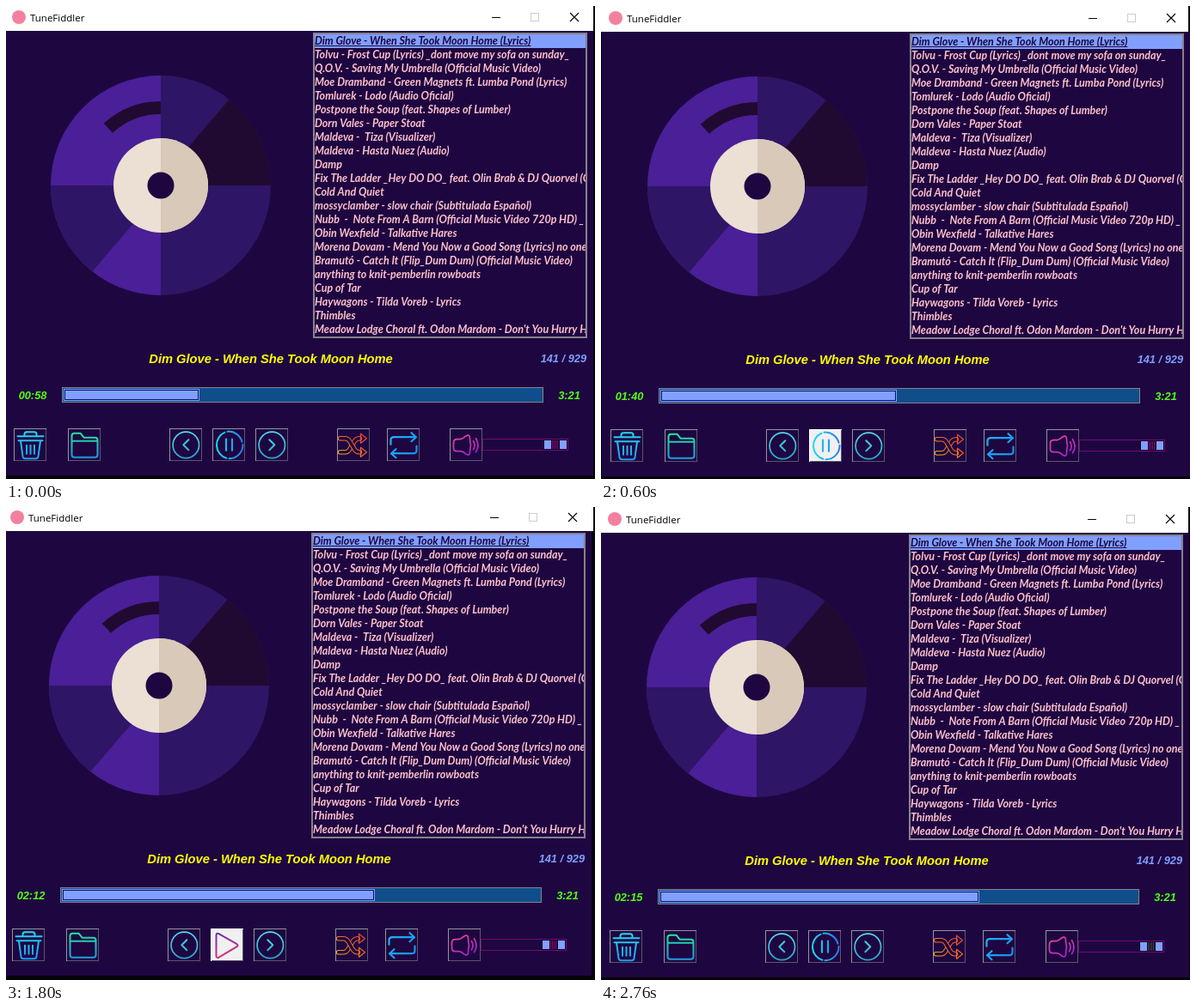
Recreate the animation shown at these times as an HTML page with a canvas. Size 685 px wide and 551 px high, loop 3000 ms.

```html
<!DOCTYPE html>
<html lang="en">
<head>
<meta charset="utf-8">
<title>TuneFiddler</title>
<style>
html, body { margin: 0; width: 100%; height: 100%; overflow: hidden; background: #050308; }
canvas { display: block; }
</style>
</head>
<body>
<canvas id="stage" width="685" height="551"></canvas>
<script>
const ctx = document.getElementById('stage').getContext('2d');
const BG = '#1e0741', BLUE = '#809fff', GRAY = '#85818c';
const STEP = 600;

const states = [
  { dx: 0, dy: 0, sec: 58, playing: true },
  { dx: 2, dy: 1, sec: 100, playing: true, hot: true },
  { dx: 0, dy: 1, sec: 132 },
  { dx: -2, dy: -1, sec: 132, hot: true },
  { dx: 1, dy: 1, sec: 135, playing: true, dimThumb: true }
];

const song = 'Dim Glove - When She Took Moon Home';
const songs = [
  song + ' (Lyrics)',
  'Tolvu - Frost Cup (Lyrics) _dont move my sofa on sunday_',
  'Q.O.V. - Saving My Umbrella (Official Music Video)',
  'Moe Dramband - Green Magnets ft. Lumba Pond (Lyrics)',
  'Tomlurek - Lodo (Audio Oficial)',
  'Postpone the Soup (feat. Shapes of Lumber)',
  'Dorn Vales - Paper Stoat',
  'Maldeva -  Tiza (Visualizer)',
  'Maldeva - Hasta Nuez (Audio)',
  'Damp',
  'Fix The Ladder _Hey DO DO_ feat. Olin Brab & DJ Quorvel (Official)',
  'Cold And Quiet',
  'mossyclamber - slow chair (Subtitulada Español)',
  'Nubb  -  Note From A Barn (Official Music Video 720p HD) _ Lyrics',
  'Obin Wexfield - Talkative Hares',
  'Morena Dovam - Mend You Now a Good Song (Lyrics) no one calls',
  'Bramutó - Catch It (Flip_Dum Dum) (Official Music Video)',
  'anything to knit-pemberlin rowboats',
  'Cup of Tar',
  'Haywagons - Tilda Voreb - Lyrics',
  'Thimbles',
  "Meadow Lodge Choral ft. Odon Mardom - Don't You Hurry Home"
];

function box(x, y, w, h, color) {
  ctx.fillStyle = color;
  ctx.fillRect(x, y, w, h);
}

function frame(x, y, w, h, color) {
  ctx.strokeStyle = color;
  ctx.lineWidth = 1;
  ctx.strokeRect(x + .5, y + .5, w - 1, h - 1);
}

function text(str, x, y, font, color, align = 'left') {
  ctx.font = font;
  ctx.fillStyle = color;
  ctx.textAlign = align;
  ctx.fillText(str, x, y);
}

function line(d, color, width) {
  ctx.strokeStyle = color;
  ctx.lineWidth = width;
  ctx.stroke(new Path2D(d));
}

// A full disc, or a slice whose tip may sit beside the centre.
function disc(x, y, r, color, from = 0, to = 360, tip = 0) {
  ctx.fillStyle = color;
  ctx.beginPath();
  if (to - from < 360) ctx.moveTo(x + tip, y);
  ctx.arc(x, y, r, from * Math.PI / 180, to * Math.PI / 180);
  ctx.fill();
}

function blend(x0, y0, x1, y1, ...colors) {
  const g = ctx.createLinearGradient(x0, y0, x1, y1);
  colors.forEach((c, i) => g.addColorStop(i / (colors.length - 1), c));
  return g;
}

function titleBar() {
  disc(15, 13, 8, '#f4809f');
  text('TuneFiddler', 28, 18, '11.5px "Open Sans", sans-serif', '#000');
  box(565, 13, 10, 1, '#000');
  frame(610, 8, 10, 10, '#ccc');
  line('M656 8 666 18M666 8 656 18', '#000', 1.1);
}

function record() {
  const x = 180, y = 209, light = '#4a1f97', mid = '#2f1565', dark = '#200a31';
  disc(x, y, 128, mid);
  disc(x, y, 128, light, 90, 270);
  disc(x, y, 128, mid, 128.5, 180, 6);
  disc(x, y, 128, dark, 308.5, 360, -6);
  ctx.beginPath();
  ctx.arc(x, y, 90.5, 227.5 * Math.PI / 180, 1.5 * Math.PI);
  ctx.strokeStyle = dark;
  ctx.lineWidth = 15;
  ctx.stroke();
  disc(x, y, 55, '#ecdfd4');
  disc(x, y, 55, '#d9c9b8', -90, 90);
  disc(x, y, 15.5, BG);
}

function playlist() {
  box(357, 31, 319, 356, GRAY);
  box(359, 33, 315, 352, BG);
  box(359, 33, 315, 16, BLUE);
  ctx.save();
  ctx.beginPath();
  ctx.rect(358, 33, 316, 352);
  ctx.clip();
  const font = 'italic bold 12.5px Lato, sans-serif';
  songs.forEach((name, i) => {
    const y = 45 + i * 16;
    text(name, 359, y, font, i ? '#ffc0cb' : BG);
    if (i) box(358, y - 9, 1, 3, '#b08da6');
    else box(359, y + 1, ctx.measureText(name).width, 1, BG);
  });
  ctx.restore();
}

function progress(state) {
  const sans = 'px "Liberation Sans", Arial, sans-serif';
  const small = 'italic bold 12.8' + sans;
  const clock = [state.sec / 60 | 0, state.sec % 60]
    .map(n => String(n).padStart(2, '0')).join(':');
  text(song, 308, 416, 'italic bold 14.7' + sans, '#ff0', 'center');
  text('141 / 929', 675, 415, small, BLUE, 'right');
  text(clock, 31, 458, small, '#5f1', 'center');
  text('3:21', 655, 458, small, '#5f1', 'center');

  box(65, 444, 560, 18, '#104e8b');
  frame(65, 444, 560, 18, GRAY);
  const end = Math.round(62 + state.sec * 2.785);
  box(67, 446, end - 66, 14, BLUE);
  frame(68, 447, end - 68, 12, '#0c1070');
}

const icons = {
  trash() {
    const c = blend(0, 3, 0, 35, '#25d8ef', '#1e9bf5');
    line('M4 8.5H34M12 8V6Q12 3.5 14.5 3.5H23.5Q26 3.5 26 6V8M5 13.5H33' +
      'M7.5 14 10 32Q10.5 34.5 13 34.5H25Q27.5 34.5 28 32L30.5 14M14.5 19V29M19 19V29M23.5 19V29', c, 2);
  },
  folder() {
    line('M4 30V8Q4 5 7 5H14L18 10H31Q34 10 34 13V30Q34 33 31 33H7Q4 33 4 30ZM4 14H34',
      blend(0, 5, 0, 33, '#24e59b', '#209be0'), 2);
  },
  prev() { chevron(-1); },
  next() { chevron(1); },
  pause() {
    const c = blend(3, 0, 35, 0, '#18e0f0', '#2a7be8');
    line('M16 34A16 16 0 0 1 14 4M17 3A16 16 0 0 1 34 15M35 18A16 16 0 0 1 19 34.5', c, 2);
    line('M15.5 12V25M22.5 12V25', c, 2.2);
  },
  play() {
    line('M6 7.5Q6 4 9 5.5L30 17.5Q32 19 30 20.5L9 33Q6 34 6 31Z',
      blend(8, 4, 16, 34, '#6a2bb0', '#e32f74'), 2);
  },
  shuffle() {
    const c = blend(32, 4, 5, 34, '#e33c35', '#f06a25', '#f8b020');
    const head = y => `M27 ${y - 5.5} 34 ${y}L27 ${y + 5.5}Z`;
    const ribbons = ['M3 27H9Q12 27 14 24L20 14Q22 11 26 11', 'M3 11H9Q12 11 14 14L20 24Q22 27 26 27'];
    ribbons.forEach((d, i) => {
      line(d, c, 5.4);
      line(d, BG, 3.4);
      line(head(i ? 27 : 11), c, 1.2);
    });
  },
  repeat() {
    const c = blend(4, 4, 34, 34, '#20b8f5', '#168be8');
    line('M4 18V13Q4 9.5 8 9.5H33M28 4.5 33.5 9.5 28 14.5' +
      'M34 20V25Q34 28.5 30 28.5H5M10 23.5 4.5 28.5 10 33.5', c, 2.2);
  },
  volume() {
    const c = blend(8, 5, 22, 34, '#f04a92', '#a020d0');
    line('M4 16Q4 12 8 12H12Q15 11.5 18 8.5Q23 5.5 23 11Q23 14 24 19Q23 24 23 27' +
      'Q23 32 18 29Q15 26 12 26H8Q4 26 4 22ZM27 14Q30 19 27 24M30 11Q35 19 30 27', c, 1.7);
  }
};

function chevron(dir) {
  const c = blend(0, 3, 0, 35, '#55dcf0', '#27a5c8');
  ctx.beginPath();
  ctx.arc(18.8, 18.7, 15.2, 0, 2 * Math.PI);
  ctx.strokeStyle = c;
  ctx.lineWidth = 1.7;
  ctx.stroke();
  const x = 18.8 - 3 * dir;
  line(`M${x} 12.5 ${x + 6 * dir} 18.5 ${x} 24.5`, c, 2);
}

function button(x, icon, hot) {
  ctx.save();
  ctx.translate(x, 492);
  if (hot) box(0, 0, 38, 38, '#f0f0f0');
  frame(0, 0, 38, 38, hot ? '#fff' : '#97919f');
  box(1, 37, 37, 1, '#5c5666');
  box(37, 1, 1, 37, '#5c5666');
  ctx.translate(.5, .7);
  ctx.lineCap = ctx.lineJoin = 'round';
  icons[icon]();
  ctx.restore();
}

function controls(state) {
  const row = [[9, 'trash'], [72, 'folder'], [190, 'prev'], [290, 'next'],
    [385, 'shuffle'], [443, 'repeat'], [516, 'volume']];
  for (const [x, icon] of row) button(x, icon);
  button(240, state.playing ? 'pause' : 'play', state.hot);

  frame(554, 504, 100, 14, '#71096f');
  box(625, 505, 28, 12, '#12052a');
  box(626, 506, 8, 10, BLUE);
  box(644, 506, 8, 10, BLUE);
  for (let x = 635; x < 643; x += 2) box(x, 506, 1, 10, state.dimThumb ? '#45434a' : '#8b0a7a');
}

function draw(now) {
  const state = states[Math.floor(now / STEP) % states.length];
  box(0, 0, 685, 551, '#050308');
  box(0, 0, 683, 29 + state.dy, '#fff');
  ctx.save();
  ctx.translate(state.dx, state.dy);
  box(-1, 29, 684, 518, BG);
  titleBar();
  record();
  playlist();
  progress(state);
  controls(state);
  ctx.restore();
}

const start = performance.now();
function tick() {
  draw(performance.now() - start);
  requestAnimationFrame(tick);
}
tick();
</script>
</body>
</html>
```
